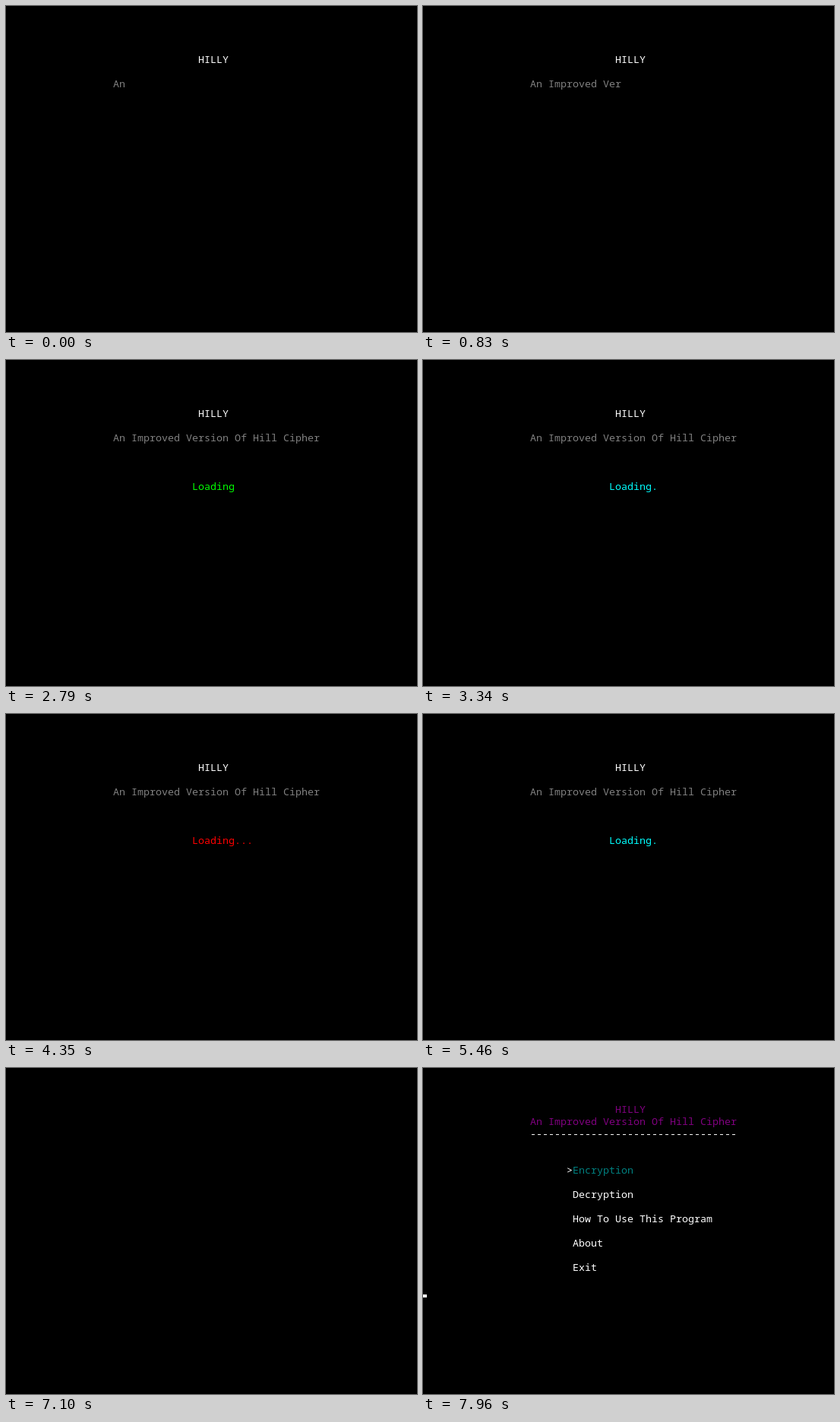
An HTML page that plays this animation: 541x429 px, repeating every 8000 ms.

```html
<!DOCTYPE html>
<html lang="en">
<head>
<meta charset="utf-8">
<title>Hilly</title>
<style>
  html, body { margin: 0; width: 100%; height: 100%; overflow: hidden; background: #000; }
  svg { display: block; }
  text { font: 13.3333px "Noto Sans Mono", "DejaVu Sans Mono", monospace; white-space: pre; }
</style>
</head>
<body>
<svg id="screen" width="541" height="429" viewBox="0 0 541 429"></svg>
<script>
const LOOP = 8000;
const CELL = { width: 8, height: 16, left: -3, baseline: 11 };
const WHITE = '#fff', GRAY = '#808080', PURPLE = '#800080', TEAL = '#008080';
const SUBTITLE = 'An Improved Version Of Hill Cipher';
const MENU = ['Encryption', 'Decryption', 'How To Use This Program', 'About', 'Exit'];

const screen = document.getElementById('screen');

function add(parent, tag, attributes = {}) {
  const node = document.createElementNS('http://www.w3.org/2000/svg', tag);
  for (const [key, value] of Object.entries(attributes)) node.setAttribute(key, value);
  return parent.appendChild(node);
}

// Places text on the console's character grid.
function print(parent, column, row, fill, content = '') {
  const x = CELL.left + column * CELL.width;
  const y = row * CELL.height + CELL.baseline;
  const node = add(parent, 'text', { x, y, fill });
  node.textContent = content;
  return node;
}

add(screen, 'rect', { width: 541, height: 429, fill: '#000' });

const intro = add(screen, 'g');
print(intro, 32, 4, WHITE, 'HILLY');
const subtitle = print(intro, 18, 6, GRAY);
const loading = print(intro, 31, 10, WHITE);

const header = add(screen, 'g');
print(header, 32, 3, PURPLE, 'HILLY');
print(header, 18, 4, PURPLE, SUBTITLE);
print(header, 18, 5, WHITE, '-'.repeat(SUBTITLE.length));

const menu = add(screen, 'g');
print(menu, 24, 8, WHITE, '>');
MENU.forEach((item, i) => print(menu, 25, 8 + 2 * i, i ? WHITE : TEAL, item));

const cursor = add(screen, 'rect', { x: CELL.left, y: 298, width: CELL.width, height: 4, fill: WHITE });

// Typing bursts: start time, first and last length, ms per character.
const BURSTS = [
  [0, 2, 2, 140],
  [140, 5, 11, 76.6],
  [750, 14, 14, 80],
  [830, 15, 22, 68.5],
  [1460, 24, 34, 70]
];
const LOADING_TIMES = [2790, 3340, 3820, 4350, 4900, 5460, 6010, 6560];
const LOADING_COLORS = ['#0f0', '#0ff', '#ff0', '#f00'];

function typedLength(t) {
  const [start, from, to, pace] = BURSTS.findLast(burst => t >= burst[0]);
  return Math.min(to, from + Math.floor((t - start) / pace));
}

function show(node, visible) {
  node.setAttribute('visibility', visible ? 'visible' : 'hidden');
}

function render(t) {
  show(intro, t < 7100);
  show(header, t >= 7180);
  show(menu, t >= 7250);
  show(cursor, t >= 7960);

  subtitle.textContent = SUBTITLE.slice(0, typedLength(t));

  const step = LOADING_TIMES.findLastIndex(time => t >= time);
  const dots = step % 4;
  loading.textContent = step < 0 ? '' : 'Loading' + '.'.repeat(dots);
  if (step >= 0) loading.setAttribute('fill', LOADING_COLORS[dots]);
}

const origin = performance.now();
function tick() {
  render((performance.now() - origin) % LOOP);
  requestAnimationFrame(tick);
}
tick();
</script>
</body>
</html>
```
